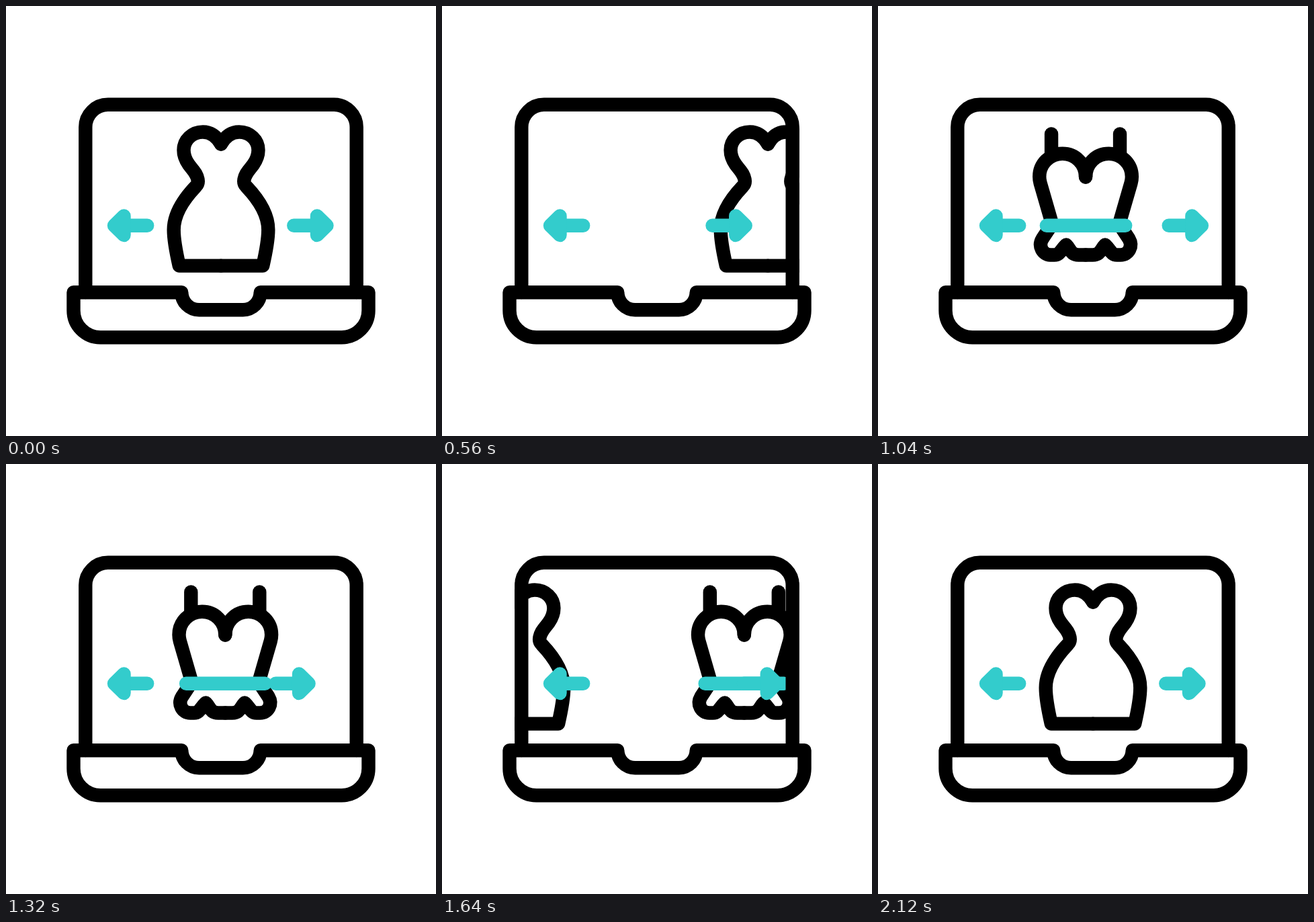
Write an HTML page that moves like this. It is 640 px wide and 640 px high and loops after 2400 ms.

```html
<!DOCTYPE html>
<html lang="en">
<head>
<meta charset="utf-8">
<title>Dress browser</title>
<style>
  html, body { margin: 0; width: 100%; height: 100%; overflow: hidden; background: #fff; }
  svg { display: block; width: 100vw; height: 100vh; }
  .line { fill: none; stroke: #000; stroke-width: 20.4; stroke-linecap: round; stroke-linejoin: round; }
  .teal { fill: #3cc; stroke: #3cc; stroke-width: 20.4; stroke-linecap: round; stroke-linejoin: round; }
</style>
</head>
<body>
<svg viewBox="0 0 640 640">
  <defs>
    <clipPath id="screen"><rect x="108" y="137" width="424" height="289"/></clipPath>
    <path id="gownHalf" d="M320 205.5 C314 195 305 187.5 293 187.5 C277 187.5 264.5 199.5 264.5 214.5
      C264.5 222 267 229 272 236 C277 243 285.4 250 285.8 261 C285.8 264 284.6 266.4 282.4 268.6
      C262 290 249.7 311 249.7 333 C249.7 351 254 370 257.8 386.6 H320"/>
    <g id="slipHalf">
      <path d="M269 190.5 V221"/>
      <path d="M320 254.5 C320 235 304.7 219.8 285.5 219.8 C266.5 219.8 251.2 235 251.2 254
        C251.2 257.5 251.6 260.5 252.5 263.5 L270 324"/>
      <path d="M268.5 327 L255.6 346.5 C249 357.5 256 370.5 268 370.5 H273.5
        C282 370.5 283.5 362.5 291 355.5 C297.5 362 298 370.5 309.5 370.5 H320"/>
    </g>
    <g id="arrow" class="teal">
      <path d="M428.3 326.8 H463"/>
      <path d="M463 312.5 L477.5 326.8 L463 341 Z"/>
    </g>
  </defs>
  <g clip-path="url(#screen)">
    <g id="gown" class="line">
      <use href="#gownHalf"/>
      <use href="#gownHalf" transform="matrix(-1 0 0 1 640 0)"/>
    </g>
    <g id="slip">
      <g class="line">
        <use href="#slipHalf"/>
        <use href="#slipHalf" transform="matrix(-1 0 0 1 640 0)"/>
      </g>
      <path class="teal" d="M261.8 326.8 H379.2"/>
    </g>
    <use href="#arrow" transform="matrix(-1 0 0 1 638.5 0)"/>
    <use id="pointer" href="#arrow"/>
  </g>
  <g class="line">
    <path d="M118.3 426 V180.3 A33.5 33.5 0 0 1 151.8 146.8 H488.2 A33.5 33.5 0 0 1 521.7 180.3 V426"/>
    <path d="M100.5 426.3 H261.3 A26 26 0 0 0 287.3 452.2 H352.7 A26 26 0 0 0 378.7 426.3 H539.5
      V453.2 A40 40 0 0 1 499.5 493.2 H140.5 A40 40 0 0 1 100.5 453.2 Z"/>
  </g>
</svg>
<script>
  const LOOP = 2400, STEP = 20, LAST = 106;
  const [gown, slip, pointer] = ['gown', 'slip', 'pointer'].map(id => document.getElementById(id));

  // [step, horizontal offset]
  const sway = [[0, 0], [26.2, -27.3], [43.2, 22], [65, -27.3], [84, 22.3], [LAST, 0]];

  const power = (k, t) => k * Math.max(0, t) ** 2.5;
  const leave = t => power(0.0523, t);
  const arrive = t => -power(0.0711, t);
  const place = (el, x) => el.setAttribute('transform', `translate(${x.toFixed(2)} 0)`);

  function swayAt(f) {
    const i = Math.max(1, sway.findIndex(([at]) => at >= f));
    const [f0, x0] = sway[i - 1], [f1, x1] = sway[i];
    const u = (f - f0) / (f1 - f0);
    return x0 + (x1 - x0) * u * u * (3 - 2 * u);
  }

  function draw(ms) {
    const f = Math.min(LAST, Math.floor((ms % LOOP) / STEP));
    place(gown, f < 54 ? leave(f - 2.9) : f < LAST ? arrive(106.4 - f) : 0);
    place(slip, f < 59.4 ? arrive(59.5 - f) : leave(f - 59.2));
    place(pointer, swayAt(f));
  }

  const start = performance.now();
  function tick() {
    draw(performance.now() - start);
    requestAnimationFrame(tick);
  }
  tick();
</script>
</body>
</html>
```
